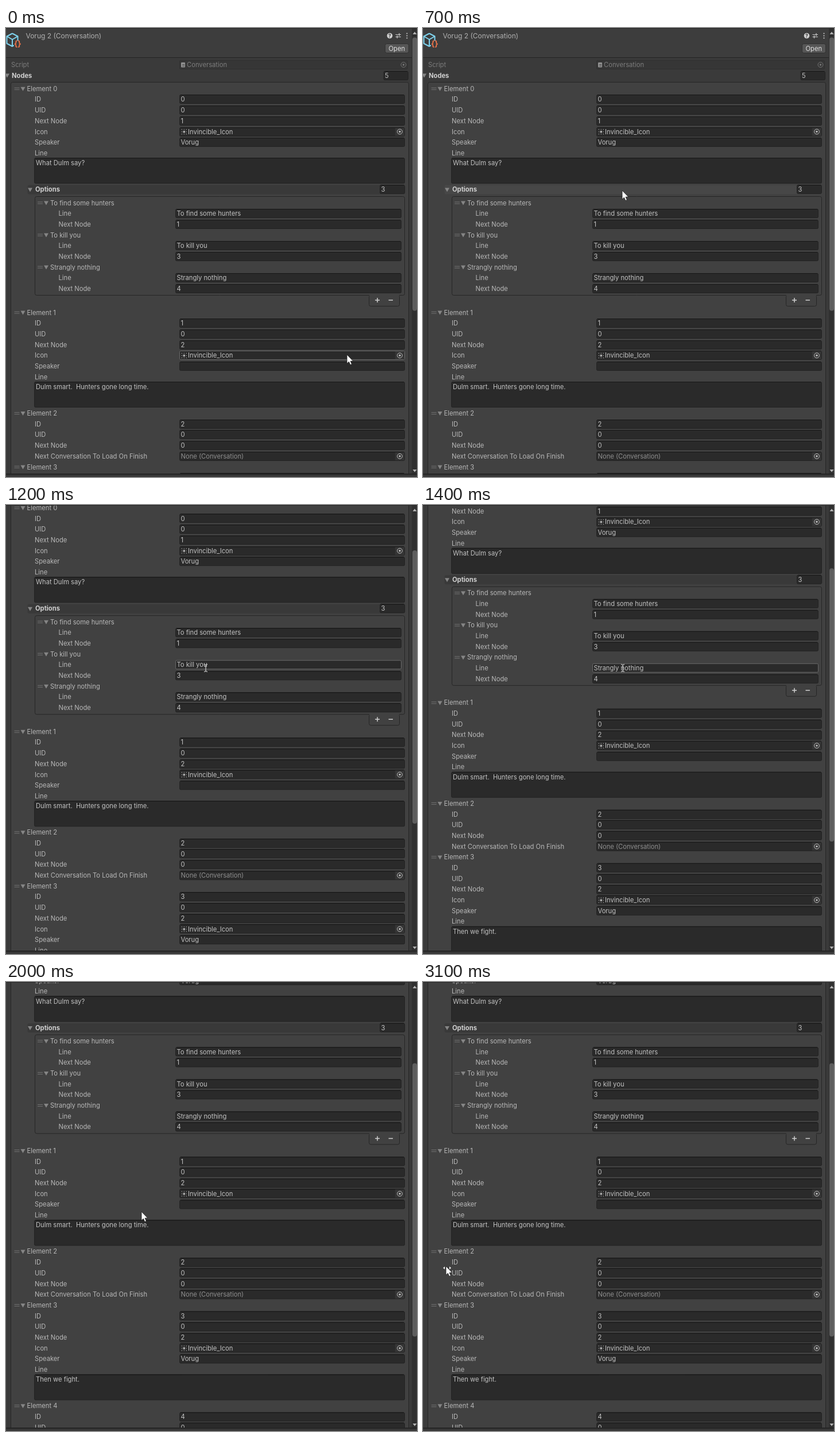
These frames come from a looping animation (716 by 782 pixels, 3300 ms). An HTML page with a canvas:

```html
<!DOCTYPE html>
<html lang="en">
<head>
<meta charset="utf-8">
<title>Conversation inspector</title>
<style>
html, body { margin: 0; width: 100%; height: 100%; overflow: hidden; background: #383838; }
canvas { display: block; width: 716px; height: 782px; }
</style>
</head>
<body>
<canvas id="stage" width="716" height="782"></canvas>
<script>
const ctx = document.getElementById('stage').getContext('2d');
const LOOP = 3300, STEP = 100, ROW = 18.68, NOTCH = 50.4;
const TEXT = '#c2c2c2', LABEL = '#b8b8b8', DIM = '#7c7c7c';
const PANEL = '#414141', BASE = '#3a3a3a', EDGE = '#262626';

// Pointer path: time, x, y
const PATH = [
  [0, 594, 569], [300, 520, 470], [600, 378, 376], [700, 347, 283], [1700, 347, 283],
  [2000, 236, 400], [2300, 138, 504], [2400, 71, 509], [2500, 56, 506], [2600, 93, 509],
  [2700, 93, 509], [2900, 70, 506], [3100, 40, 495], [3300, 40, 495]
];
const SCROLL_TIMES = [900, 1100, 1300, 1500];

let mouse = { x: 0, y: 0 };
let cursor = 'arrow';

function pointerAt(t) {
  const i = Math.max(1, PATH.findIndex(p => p[0] >= t));
  const [t0, x0, y0] = PATH[i - 1], [t1, x1, y1] = PATH[i];
  const k = (t - t0) / (t1 - t0);
  return { x: x0 + (x1 - x0) * k, y: y0 + (y1 - y0) * k };
}

function text(str, x, y, color = LABEL, weight = 400, size = 11.2) {
  ctx.font = `${weight} ${size}px Inter, sans-serif`;
  ctx.fillStyle = color;
  ctx.fillText(str, x, y + 4);
}

function box(x, y, w, h, fill, stroke, r = 2) {
  ctx.beginPath();
  ctx.roundRect(x + .5, y + .5, w - 1, h - 1, r);
  ctx.fillStyle = fill;
  ctx.fill();
  if (!stroke) return;
  ctx.strokeStyle = stroke;
  ctx.lineWidth = 1;
  ctx.stroke();
}

function shape(points, fill, x = 0, y = 0) {
  ctx.beginPath();
  points.forEach(([px, py]) => ctx.lineTo(x + px, y + py));
  ctx.closePath();
  ctx.fillStyle = fill;
  ctx.fill();
}

function lines(color, width, ...paths) {
  ctx.beginPath();
  for (const path of paths) path.forEach(([x, y], i) => i ? ctx.lineTo(x, y) : ctx.moveTo(x, y));
  ctx.strokeStyle = color;
  ctx.lineWidth = width;
  ctx.stroke();
}

function disc(x, y, r, color) {
  ctx.beginPath();
  ctx.arc(x, y, r, 0, 7);
  ctx.fillStyle = color;
  ctx.fill();
}

const over = (x, y, w, h) =>
  mouse.x >= x && mouse.x < x + w && mouse.y >= y && mouse.y < y + h;

function field(x, y, w, h, kind = 'beam') {
  const hot = over(x, y - .5, w, h + 1);
  if (hot) cursor = kind;
  box(x, y, w, h, '#2a2a2a', hot ? '#686868' : '#222222');
  if (!hot) lines('#161616', 1, [[x + 2, y + .5], [x + w - 2, y + .5]]);
}

function input(x, y, right, value) {
  field(x, Math.round(y - 8), right - x, 16);
  text(value, x + 2.5, y, TEXT);
}

function picker(x, y, color) {
  ctx.beginPath();
  ctx.arc(x, y, 4.4, 0, 7);
  ctx.strokeStyle = color;
  ctx.lineWidth = 1;
  ctx.stroke();
  disc(x, y, 1.7, color);
}

function objectField(y, value, hasIcon) {
  field(302, Math.round(y - 8), 393, 16, 'arrow');
  ctx.fillStyle = '#353535';
  ctx.fillRect(678, Math.round(y - 8) + 1, 16, 14);
  if (hasIcon) {
    ctx.fillStyle = '#a9a9a9';
    ctx.fillRect(308.5, y - 1.5, 3.5, 3.5);
    for (const dx of [-4, 0, 4]) for (const dy of [-4, 0, 4])
      if (dx || dy) ctx.fillRect(309.7 + dx, y - .4 + dy, 1.2, 1.2);
  }
  text(value, hasIcon ? 317 : 304.5, y, hasIcon ? TEXT : '#8e8e8e');
  picker(686, y, '#c0c0c0');
}

function foldArrow(x, y) {
  shape([[-4, -3], [4, -3], [0, 4]], '#858585', x, y);
}

function foldout(x, y, title) {
  lines('#727272', 1, [[x - 22, y - 1.5], [x - 13, y - 1.5]], [[x - 22, y + 1.5], [x - 13, y + 1.5]]);
  foldArrow(x - 7, y);
  text(title, x, y);
}

function numberRow(x, left, right, y, label, value) {
  if (over(x - 14, y - 9.3, left - x + 10, ROW)) cursor = 'slider';
  text(label, x, y);
  input(left, y, right, value);
}

function textArea(y, value) {
  text('Line', 50, y);
  field(49, Math.round(y + 8.5), 646, 45);
  text(value, 52, y + 17.4, TEXT);
}

function element(index, y, next, extra) {
  foldout(36.5, y, 'Element ' + index);
  numberRow(50, 302, 695, y + ROW, 'ID', index);
  numberRow(50, 302, 695, y + ROW * 2, 'UID', 0);
  numberRow(50, 302, 695, y + ROW * 3, 'Next Node', next);
  if (!extra) return;
  const row = y + ROW * 4;
  if (extra.finish) {
    text('Next Conversation To Load On Finish', 50, row);
    objectField(row, 'None (Conversation)', false);
    return;
  }
  text('Icon', 50, row);
  objectField(row, 'Invincible_Icon', true);
  text('Speaker', 50, row + ROW);
  input(302, row + ROW, 695, extra.speaker);
  textArea(row + ROW * 2, extra.line);
}

function options() {
  const hot = over(38, 273, 658, 17);
  box(37, 273, 659, 17, hot ? '#474747' : '#393939', null, 3);
  foldArrow(42, 281.5);
  text('Options', 51, 281.2, '#d0d0d0', 700);
  input(651, 281.2, 695, 3);

  box(50, 293, 645, 173, PANEL, EDGE, 3);
  [['To find some hunters', 1], ['To kill you', 3], ['Strangly nothing', 4]].forEach(([line, next], i) => {
    const y = 304.5 + i * ROW * 3;
    foldout(77, y, line);
    text('Line', 91.5, y + ROW);
    input(295, y + ROW, 689, line);
    numberRow(91.5, 295, 689, y + ROW * 2, 'Next Node', next);
  });
  box(632, 465, 54, 20, PANEL, EDGE, 3);
  ctx.fillStyle = PANEL;
  ctx.fillRect(633, 464, 52, 3);
  lines('#d0d0d0', 1.5, [[643, 474], [651, 474]], [[647, 470], [647, 478]], [[666.5, 474], [674, 474]]);
}

function header() {
  ctx.fillStyle = '#3d3d3d';
  ctx.fillRect(0, 0, 708, 51);
  ctx.fillStyle = '#242424';
  ctx.fillRect(0, 51, 708, 1);

  ctx.lineJoin = 'round';
  lines('#7fd3ee', 2,
    [[11, 9.5], [20.5, 14.5], [20.5, 26], [11, 32], [1.5, 27], [1.5, 14.5], [11, 9.5]],
    [[1.5, 14.5], [11, 20], [20.5, 14.5]], [[11, 20], [11, 32]]);
  ctx.fillStyle = '#3d3d3d';
  ctx.fillRect(14, 22, 14, 13);
  text('{}', 14, 27.5, '#f0744a', 700, 13.5);
  text('Vorug 2 (Conversation)', 34.5, 13.5, '#b0b0b0', 400, 12);

  disc(668.5, 13.5, 4.8, '#d0d0d0');
  text('?', 666, 13.2, '#333', 700, 8.5);
  lines('#c8c8c8', 1.2, [[678.5, 11.5], [688, 11.5]], [[678.5, 15.5], [688, 15.5]],
    [[685, 9], [685, 14]], [[681.5, 13], [681.5, 18]]);
  for (const y of [9.5, 13.5, 17.5]) disc(698.5, y, 1.1, '#c8c8c8');
  box(660, 27, 42, 17, '#565656', '#303030', 3);
  text('Open', 666.5, 35.5, '#e0e0e0');
}

function inspector() {
  header();
  text('Script', 9, 64, DIM);
  box(302, 56, 398, 16, '#363636', '#303030');
  box(304.5, 59.5, 8, 9.5, '#929292', null, 1);
  lines('#444', 1, [[307, 63.5], [311, 63.5]], [[307, 66], [311, 66]]);
  text('Conversation', 315, 64, DIM);
  picker(692.5, 64, '#747474');

  foldArrow(2, 82.5);
  text('Nodes', 10, 82.5, '#d0d0d0', 700);
  input(657.5, 82.5, 701, 5);

  box(8, 94, 694, 1100, PANEL, EDGE, 3);
  element(0, 105.8, 1, { speaker: 'Vorug', line: 'What Dulm say?' });
  options();
  element(1, 495.6, 2, { speaker: '', line: 'Dulm smart.  Hunters gone long time.' });
  element(2, 671.1, 0, { finish: true });
  element(3, 764.6, 2, { speaker: 'Vorug', line: 'Then we fight.' });
  element(4, 939.9, 0);
}

function frame(scroll) {
  ctx.fillStyle = '#303030';
  ctx.fillRect(707, 0, 9, 776);
  box(707.5, 16 + scroll * .62, 9, 477, '#5e5e5e', null, 4);
  shape([[-3.5, 2], [3.5, 2], [0, -2.5]], '#b4b4b4', 712, 9);
  shape([[-3.5, -2], [3.5, -2], [0, 2.5]], '#b4b4b4', 712, 771);
  ctx.fillStyle = '#252525';
  ctx.fillRect(0, 0, 716, 1);
  ctx.fillRect(0, 776, 716, 2);
  ctx.fillStyle = '#383838';
  ctx.fillRect(0, 778, 716, 4);
}

function drawCursor({ x, y }) {
  if (cursor === 'beam') {
    const path = [[x - 2, y - 5.5], [x + 1, y - 4.5], [x + 4, y - 5.5]];
    const foot = [[x - 2, y + 7.5], [x + 1, y + 6.5], [x + 4, y + 7.5]];
    lines('#dcdcdc', 1.1, path, foot, [[x + 1, y - 4.5], [x + 1, y + 6.5]]);
    return;
  }
  const arrow = [[0, 0], [0, 15.2], [3.4, 12.2], [5.8, 17.6], [8.4, 16.4], [6, 11.3], [10.6, 11]];
  shape(arrow, '#ffffff', x, y);
  const outline = arrow.concat([arrow[0]]).map(([px, py]) => [x + px, y + py]);
  lines('#222', .8, outline);
  if (cursor === 'slider') {
    shape([[-2, 0.5], [-2, 5.5], [-5, 3]], '#f4f4f4', x, y);
    shape([[6, 0.5], [6, 5.5], [9, 3]], '#f4f4f4', x, y);
  }
}

function draw(now) {
  const t = Math.floor((now % LOOP) / STEP) * STEP;
  const scroll = NOTCH * SCROLL_TIMES.filter(s => t >= s).length;
  const pointer = pointerAt(t);
  mouse = { x: pointer.x, y: pointer.y + scroll };
  cursor = 'arrow';

  ctx.fillStyle = BASE;
  ctx.fillRect(0, 0, 716, 782);
  ctx.save();
  ctx.beginPath();
  ctx.rect(0, 0, 708, 776);
  ctx.clip();
  ctx.translate(0, -scroll);
  inspector();
  ctx.restore();
  frame(scroll);
  drawCursor(pointer);
}

let start;
function tick(now) {
  start ??= now;
  draw(now - start);
  requestAnimationFrame(tick);
}
draw(0);
requestAnimationFrame(tick);
</script>
</body>
</html>
```
